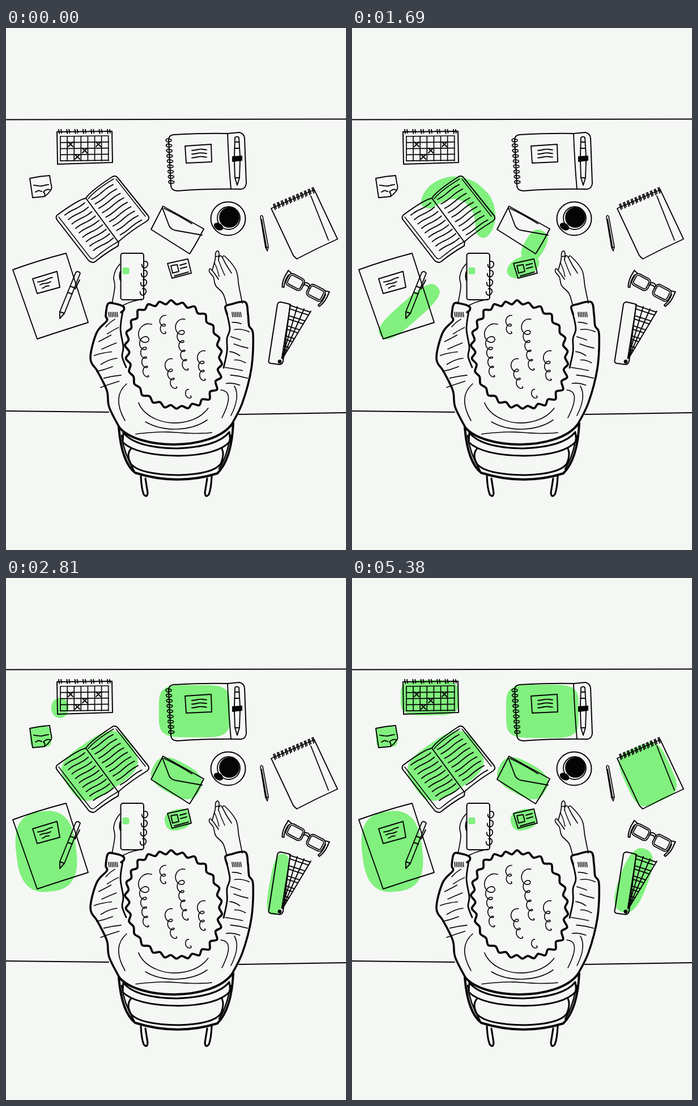
An HTML page with a canvas for the animation above (5440 ms loop, 600 px wide and 920 px high).

```html
<!DOCTYPE html>
<html lang="en">
<head>
<meta charset="utf-8">
<title>Desk from above</title>
<style>
html, body { margin: 0; width: 100%; height: 100%; overflow: hidden; background: #f5f7f5; }
canvas { display: block; width: 600px; height: 920px; }
</style>
</head>
<body>
<canvas id="stage" width="600" height="920"></canvas>
<script>
const ctx = document.getElementById('stage').getContext('2d');
const PAPER = '#f5f7f5', INK = '#050505', GREEN = '#81f07e';
const LOOP = 5440, STEP = 62.5, TAU = Math.PI * 2;
const lerp = (a, b, u) => a + (b - a) * u;
const clamp = u => Math.max(0, Math.min(1, u));
const range = (n, f) => Array.from({ length: n }, (_, i) => f(i));

function seeded(seed) {
  return () => {
    seed = (seed * 16807) % 2147483647;
    return seed / 2147483647;
  };
}

// Drawing helpers
function paint(path, w, fill) {
  if (fill) { ctx.fillStyle = fill; ctx.fill(path); }
  if (w) { ctx.lineWidth = w; ctx.stroke(path); }
}
const ink = (d, w = 1.9, fill) => paint(new Path2D(d), w, fill);

function smooth(p, closed) {
  const n = p.length, path = new Path2D();
  const at = i => closed ? p[(i + n) % n] : p[Math.max(0, Math.min(n - 1, i))];
  path.moveTo(...p[0]);
  for (let i = 0; i < (closed ? n : n - 1); i++) {
    const [a, b, c, d] = [at(i - 1), at(i), at(i + 1), at(i + 2)];
    path.bezierCurveTo(b[0] + (c[0] - a[0]) / 6, b[1] + (c[1] - a[1]) / 6,
      c[0] - (d[0] - b[0]) / 6, c[1] - (d[1] - b[1]) / 6, c[0], c[1]);
  }
  if (closed) path.closePath();
  return path;
}

function curve(s, w = 1.7) {
  paint(smooth(s.split('  ').map(p => p.split(' ').map(Number))), w);
}

function oval(x, y, rx, ry, { tilt = 0, from = 0, to = TAU, w = 1.8, fill } = {}) {
  const path = new Path2D();
  path.ellipse(x, y, rx, ry, tilt, from, to);
  paint(path, w, fill);
}

function wave(x0, y0, x1, y1, amp = 0.8, w = 1.9) {
  const len = Math.hypot(x1 - x0, y1 - y0);
  paint(smooth(range(8, i => {
    const u = i / 7, o = amp * Math.sin(u * 6 + x0);
    return [lerp(x0, x1, u) - o * (y1 - y0) / len, lerp(y0, y1, u) + o * (x1 - x0) / len];
  })), w);
}

// Hanging lock of hair: a wide hook that tightens into small loops
function curl(x0, y0, x1, y1, hook, turns) {
  const n = turns * 12;
  paint(smooth(range(n + 1, i => {
    const s = i / n, a = -0.9 - s * turns * TAU, r = lerp(4.6, hook, (1 - s) ** 5);
    return [lerp(x0, x1, s) + r * (1 + Math.cos(a)), lerp(y0, y1, s) + r * Math.sin(a)];
  })), 1.6);
}

// Person and furniture
function room() {
  ink('M0 161.5L600 160.5M0 675L181 677M411 681L600 678', 1.9);
}

function chair() {
  ink('M199 704Q204 765 228 784Q302 807 373 785Q398 760 401 697', 4);
  ink('M207 713Q228 740 302 741Q374 738 394 712L396 728Q374 753 304 754Q230 753 206 730Z', 3);
  ink('M221 741Q211 752 221 769Q237 787 305 788Q366 786 379 768Q386 752 381 741', 3);
  ink('M204 718Q208 750 226 780M396 718Q390 756 376 777', 2.4);
  for (const [x, s] of [[242, 1], [359, -1]])
    ink(`M${x - 4 * s} 790Q${x - 3 * s} 812 ${x + s} 822Q${x + 7 * s} 829 ${x + 8 * s} 819L${x + 4 * s} 794`, 3.2);
}

function phone() {
  const path = new Path2D();
  path.roundRect(202.5, 397, 40.5, 82, 4);
  paint(path, 2, PAPER);
  curve('201 416  194 426  190 440  192 456  187 486');
  ink('M202 430Q200 437 202 444', 3);
  for (let i = 0; i < 4; i++)
    oval(245 - i, 417 + i * 16, 5, 6, { tilt: 0.5, from: -2.4, to: 2.8 });
  curve('206 489  220 483  239 478');
}

function rightHand() {
  curve('389 487  383 468  370 454  366 439  359 430  360 424  366 430  375 443');
  curve('364 427  369 408  370 396  374 393  376 398  375 409');
  curve('375 404  380 402  389 418  398 432');
  curve('382 404  387 403  406 427  411 455  417 485');
  ink('M370 403L375 402M368 414Q373 424 376 438M375 409Q380 423 386 436', 1.4);
}

function folds(rand, centre, tilt) {
  for (let i = 0; i < 9; i++) {
    const y = 520 + i * 13.5, half = 8 + rand() * 9, rise = tilt * (2 + rand() * 5);
    const x = centre(y) + (i % 2 ? 5 : -5), sag = 6 * (rand() - 0.7);
    ink(`M${x - half} ${y + rise}Q${x} ${y + sag} ${x + half} ${y - rise}`, 1.6);
  }
}

function body() {
  curve('203 501  208 497  207 491  193 486  180 486  176 507  178 516  160 537  149 582  162 606  178 639  182 668  200 704', 3.6);
  curve('206 499  202 530  207 562  205 579  212 598', 2.8);
  curve('390 504  387 491  397 487  422 483  427 504  429 525  436 540  433 600  417 661  397 701', 3.6);
  curve('389 500  395 530  390 547  390 570  384 599', 2.8);
  for (const x of [181, 399])
    for (let i = 0; i < 6; i++) ink(`M${x + i * 3} 501l1 8`, 1.5);
  folds(seeded(7), y => 176 + (y - 575) ** 2 / 230, 1);
  folds(seeded(23), y => 412 - (y - 520) * 0.06, -0.6);
  ink('M199 703C232 744 362 746 398 699', 4);
  ink('M213 627Q186 650 210 692M379 638Q405 640 381 687M403 631Q414 650 397 683', 1.6);
  oval(298, 646, 67, 50, { from: 0.5, to: 2.85, w: 1.6 });
  oval(298, 656, 78, 51, { from: 0.75, to: 2.3, w: 1.6 });
  wave(229, 715, 363, 712, 2, 1.6);
}

function hair() {
  const rand = seeded(41), n = 52;
  paint(smooth(range(n, i => {
    const a = i / n * TAU, bump = (i % 2 ? 1 : -1) * (2 + rand() * 2.2);
    const k = (Math.abs(Math.cos(a)) ** 2.3 + Math.abs(Math.sin(a)) ** 2.3) ** (-1 / 2.3);
    const x = (82 * k + bump) * Math.cos(a), y = (92 * k + bump) * Math.sin(a);
    return [296 + x + y * 0.05, 576 + y + x * 0.06];
  }), true), 3.8, PAPER);
  curl(233, 534, 243, 616, 15, 5);
  curl(271, 512, 273, 539, 7, 2);
  curl(298, 522, 313, 604, 11, 5);
  curl(279, 590, 293, 636, 9, 3);
  curl(337, 576, 343, 622, 9, 3);
  curl(316, 640, 318, 652, 4, 1);
}

// Things on the desk
function calendar() {
  ink('M90 183L187 182 188 237 91 240Z', 2);
  for (let i = 0; i < 8; i++) ink(`M${96 + i * 12.1} 191v43`, 1.7);
  for (let i = 0; i < 5; i++) ink(`M96 ${191 + i * 10.8}L181 ${190 + i * 10.8}`, 1.7);
  for (const [x, y] of [[114, 205], [163, 205], [139, 216], [126, 227]])
    ink(`M${x - 4} ${y - 4}l8 8m0 -8l-8 8`);
  for (let i = 0; i < 7; i++) ink(`M${93 + i * 14.3} 179l1 7m3 -7l1 6`);
}

function note() {
  ink('M42 265Q60 261 77 260L79 273Q82 282 79 286Q74 293 68 297L47 299ZM79 286Q73 282 66 289Q70 292 68 297');
  wave(49, 278, 75, 277, 1);
  wave(52, 288, 63, 287, 1);
}

function notebook() {
  ink('M287 197Q287 189 296 188Q350 185 391 186L412 184Q420 186 421 194L424 274Q423 283 415 284Q355 283 303 287Q292 287 291 278Z', 2);
  ink('M391 186Q393 240 397 284M316 208L362 205 363 236 318 238Z');
  for (let i = 0; i < 3; i++) wave(328, 215 + i * 6.5, 354, 214 + i * 6.5);
  for (let i = 0; i < 9; i++) {
    const x = 287 + i * 0.6, y = 197 + i * 9.2;
    ink(`M${x + 5} ${y}q-9 -4 -10 1q2 5 10 1`, 1.7);
  }
  ink('M404 193Q408 190 411 193L413 226M404 193L403 226M404 201h8M403 212h9M403 235L404 264 408 277 412 264 413 234M404 264h8');
  ink('M400 227L416 226 416 233 400 235Z', 2, INK);
}

function book() {
  ink('M141 300Q148 288 188 262Q194 259 198 265L251 331Q254 336 249 340Q218 359 198 377Z', 2);
  ink('M141 300Q128 302 90 330Q87 334 90 338L146 410Q152 415 157 412Q178 395 198 384L199 376', 2);
  ink('M93 333L148 404Q152 409 157 405Q176 389 197 377M145 301Q157 286 190 266M194 266L246 332', 1.5);
  for (let i = 0; i < 9; i++) {
    const x = i * 6.3, y = i * 7.8;
    wave(104 + x, 330 + y, 139 + x, 308 + y);
    wave(151 + x, 302 + y, 189 + x, 276 + y);
  }
}

function envelope() {
  ink('M277 314L349 354Q337 378 324 398L256 355ZM276 317L288 349Q292 356 301 357L346 365M279 318Q306 331 328 345');
}

function coffee() {
  oval(392, 336, 30.5, 29.5, { w: 2 });
  oval(393, 335, 20, 20, { fill: PAPER });
  oval(394, 334, 17, 17, { fill: INK });
  oval(375, 350, 8, 5, { tilt: 0.5, fill: INK });
}

function pencil() {
  ink('M449 333Q450 328 453 332L463 386 461 393 458 387ZM451 337L460 388M458 387L463 386', 1.6);
}

function notepad() {
  ink('M468 318L544 285 585 372Q549 388 513 407L507 401ZM538 296L569 374', 1.8);
  for (let i = 0; i < 11; i++) ink(`M${472 + i * 6.8} ${311 - i * 2.9}l3 9m-1 -10l3 8`);
}

function card() {
  ink('M285 415L321 407 327 432 293 441ZM291 419L302 417 305 429 294 432ZM307 418L318 415M308 424L319 421M297 437L322 430');
}

function folder() {
  ink('M12 426Q56 410 106 397L145 519Q100 533 55 548ZM47 442L90 429 95 457 55 468Z');
  for (let i = 0; i < 3; i++) wave(56 + i * 4, 448 + i * 5, 82 - i * 3, 440 + i * 7, 0.6);
  ink('M123 431Q127 427 131 432L103 503 95 512 95 500ZM95 500L103 503M113 455L121 458M109 466L117 469M130 444L122 460');
}

function glasses() {
  ctx.save();
  ctx.translate(534, 447);
  ctx.rotate(0.48);
  for (const side of [-1, 1]) {
    ctx.save();
    ctx.scale(side, 1);
    for (const inset of [0, 3]) {
      const lens = new Path2D();
      lens.roundRect(5 + inset, inset, 31 - inset * 2, 23 - inset * 2, 7 - inset);
      paint(lens, 1.8);
    }
    ink('M33 1L41 -1 41 6M41 2Q43 18 37 30L34 29Q39 18 37 6', 2);
    ctx.restore();
  }
  ink('M-6 6Q0 0 6 6M-6 10Q0 5 6 10');
  ctx.restore();
}

function swatches() {
  const at = (i, u) => `${lerp(486, 502 + i * 12, u)} ${lerp(586, 487 + i * 4, u)}`;
  for (let i = 0; i < 4; i++) {
    ink(`M${at(i, 0.04)}L${at(i, 1)}`);
    for (let k = 0; k < 5 && i < 3; k++)
      for (const u of [0.2 + k * 0.18, 0.26 + k * 0.18]) ink(`M${at(i, u)}L${at(i + 1, u)}`);
  }
  ink('M479 487Q480 483 485 483L498 486Q502 487 501 491L489 587Q488 593 482 593L467 591Q462 590 464 584Z', 2);
  oval(483, 588, 2.5, 2.5, { fill: INK });
}

// A blob is a superellipse that can tilt and bend along an arc.
// Key: time, x, y, half width, half height, tilt, roundness power, bend
const blob = (...keys) => keys.map(([t, x, y, rx, ry = rx, tilt = 0, power = 2, bend = 0]) =>
  [t, x, y, rx, ry, tilt, power, bend]);
const BUD = [690, 211, 428, 3];

const firstWave = {
  book: blob(BUD, [1187, 208, 391, 28, 23, 2.4], [1437, 222, 322, 46, 20, 1.5, 2.5, 0.4],
    [1687, 206, 288, 92, 20, 0.49, 3, 1.7], [2062, 165, 331, 66, 47, -0.6, 3.3]),
  card: blob(BUD, [1187, 253, 438, 25], [1437, 290, 427, 22, 19],
    [1687, 302, 421, 30, 18, -0.4], [2000, 303, 426, 23, 18, -0.25, 2.6]),
  envelope: blob([1375, 298, 425, 8], [1687, 322, 384, 30, 18, -1.05, 2.6], [2062, 301, 353, 46, 29, 0.5, 2.8]),
  folder: blob(BUD, [1187, 179, 455, 27, 21.5], [1437, 132, 476, 36, 22, -0.6],
    [1687, 101, 500, 66, 19, -0.72, 3], [2062, 71, 482, 53, 71, -0.12, 2.7])
};
const secondWave = {
  notebook: blob([2125, 210, 285, 8], [2375, 265, 230, 39, 28], [2937, 336, 235, 64, 47, 0, 4.5]),
  swatches: blob([2125, 325, 385, 9], [2375, 397, 412, 34, 28, 0.1], [2600, 454, 468, 30, 26, 0.7],
    [2812, 480, 540, 54, 15, 1.75, 3], [3187, 497, 533, 59, 25, 1.93, 2.6]),
  note: blob([2125, 42, 440, 8], [2375, 45, 349, 28.5, 32.5, 0.1], [2750, 61, 280, 18.5, 18, -0.05, 5])
};
const thirdWave = {
  calendar: blob([2625, 64, 272, 7], [2875, 101, 221, 17, 20], [3250, 124, 211, 38, 31, 0, 4],
    [3562, 137, 211, 51, 31, 0, 4]),
  notepad: blob([2937, 415, 240, 6], [3250, 474, 286, 27, 25], [3562, 502, 335, 33, 40, -0.3, 2.5],
    [4062, 522, 346, 42, 52, -0.43, 4])
};
const blobs = [firstWave, secondWave, thirdWave].flatMap(Object.values);

function outline([, x, y, rx, ry, tilt, power, bend]) {
  const round = v => Math.sign(v) * Math.abs(v) ** (2 / power);
  return smooth(range(48, i => {
    const a = i / 48 * TAU, u = round(Math.cos(a));
    let lx = rx * u, ly = ry * round(Math.sin(a));
    if (bend > 0.01) {
      const radius = rx / bend, arm = radius - ly;
      lx = Math.sin(bend * u) * arm;
      ly = radius - Math.cos(bend * u) * arm;
    }
    return [x + lx * Math.cos(tilt) - ly * Math.sin(tilt), y + lx * Math.sin(tilt) + ly * Math.cos(tilt)];
  }), true);
}

function pose(keys, t) {
  if (t <= keys[0][0]) return null;
  const last = keys.length - 1, next = keys.findIndex(k => k[0] > t);
  if (next < 0) return keys[last];
  const a = keys[next - 1], b = keys[next];
  let u = (t - a[0]) / (b[0] - a[0]);
  if (next === last) u = 1 - (1 - u) ** 2;
  else if (next === 1) u = u * u * (3 - 2 * u);
  return a.map((v, i) => lerp(v, b[i], u));
}

function icon(t) {
  const path = new Path2D();
  path.roundRect(205.5, 422, 12, 12, 3 + 3 * (clamp((t - 690) / 310) - clamp((t - 1250) / 310)));
  paint(path, 0, GREEN);
}

function draw(t) {
  ctx.fillStyle = PAPER;
  ctx.fillRect(0, 0, 600, 920);
  ctx.strokeStyle = INK;
  ctx.lineCap = ctx.lineJoin = 'round';
  for (const part of [room, chair, phone, rightHand, body, hair]) part();
  for (const keys of blobs) {
    const shape = pose(keys, t);
    if (shape) paint(outline(shape), 0, GREEN);
  }
  icon(t);
  for (const part of [calendar, note, notebook, book, envelope, coffee, pencil,
    notepad, card, folder, glasses, swatches]) part();
}

const start = performance.now();
function tick() {
  const t = (performance.now() - start) % LOOP;
  draw(Math.floor((t + 3) / STEP) * STEP);
  requestAnimationFrame(tick);
}
tick();
</script>
</body>
</html>
```
